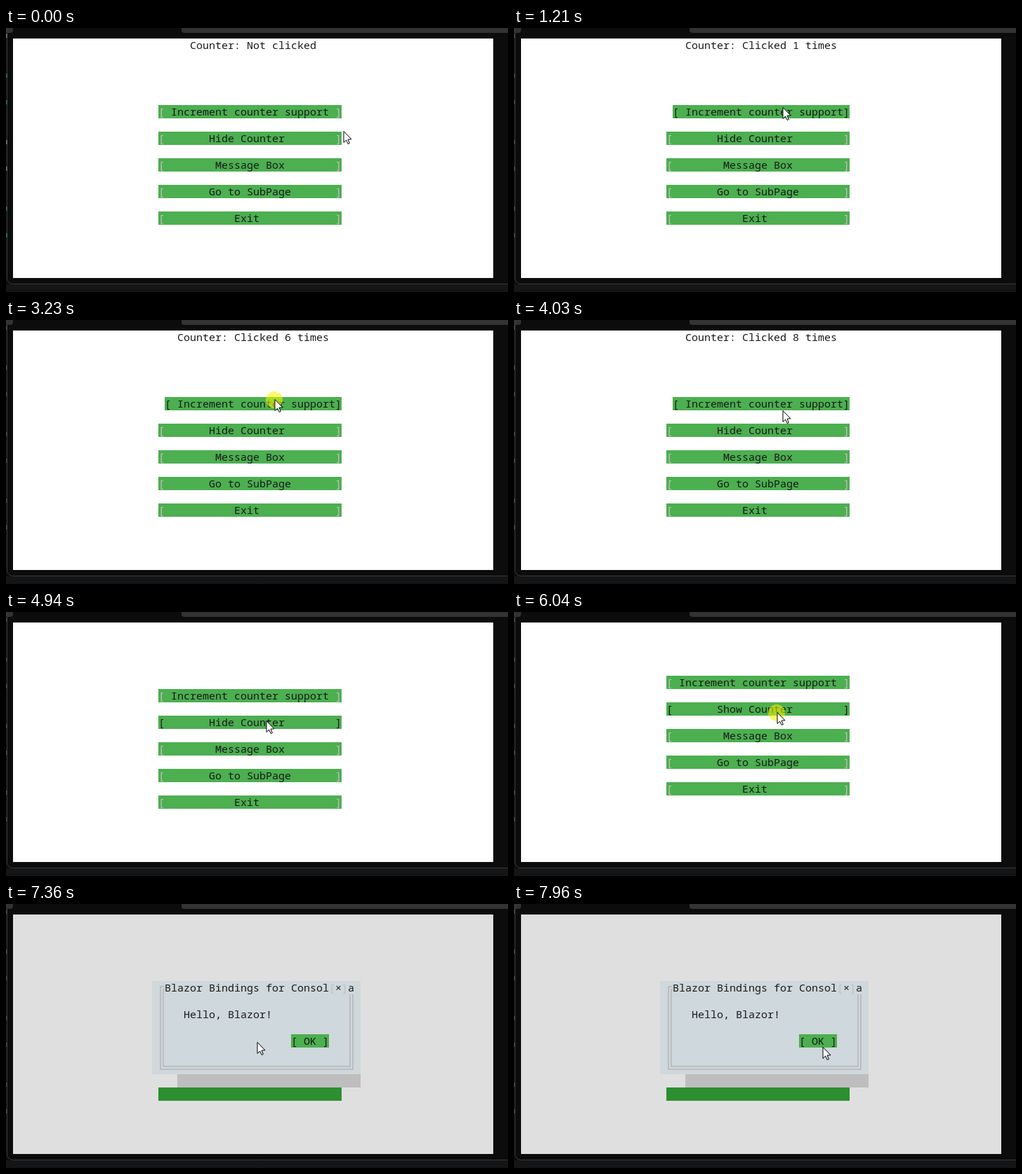
An HTML page with a canvas for the animation above (8 s loop, 715 by 377 pixels).

```html
<!DOCTYPE html>
<html>
<head>
<meta charset="utf-8">
<style>
html, body { margin: 0; width: 100%; height: 100%; overflow: hidden; background: #0c0c0c; }
canvas { display: block; }
</style>
</head>
<body>
<canvas id="stage" width="715" height="377"></canvas>
<script>
const c = document.getElementById('stage').getContext('2d');
const LOOP = 8000, STEP = 100, COL = 9, ROW = 19;
const INK = '#1a1a1a', GREEN = '#4caf50', DIM = '#c0c0c0', PANEL = '#cfd8dc';

// Pointer moves: start time, number of steps, end point
const moves = [
  [100, 4, 397, 103], [600, 2, 389, 113], [1110, 1, 382, 113], [4030, 1, 382, 129],
  [4130, 4, 370, 155], [5540, 4, 374, 143], [6540, 8, 357, 197], [7460, 6, 439, 204]
];
const counts = [1110, 2010, 2310, 2410, 2830, 3230, 3430, 3730];
const HIDE = 4840, SHOW = 6040, FOCUS_BOX = 7260, DIALOG = 7360, HOLD = 400;
const clicks = [...counts, HIDE, SHOW];

const since = (times, t, from, to) => times.some(k => t >= k + from && t < k + to);

function rect(x, y, w, h, color) {
  c.fillStyle = color;
  c.fillRect(x, y, w, h);
}

function text(s, x, y, color = INK) {
  c.fillStyle = color;
  c.fillText(s, x, y + 15);
}

function pointerAt(t) {
  let x = 480, y = 147;
  for (const [start, n, ex, ey] of moves) {
    if (t < start) break;
    const p = Math.min(1, (Math.floor((t - start) / STEP) + 1) / n);
    x += (ex - x) * p;
    y += (ey - y) * p;
  }
  return [Math.round(x), Math.round(y)];
}

function pointer(x, y, held) {
  if (held) {
    c.fillStyle = 'rgba(245,245,0,.57)';
    c.beginPath();
    c.arc(x, y + 1, 12, 0, 7);
    c.fill();
  }
  c.save();
  c.translate(x + 1, y + .5);
  c.fill(arrow);
  c.fillStyle = '#fff';
  c.fill(arrow);
  c.strokeStyle = '#000';
  c.lineWidth = 1;
  c.stroke(arrow);
  c.restore();
}
const arrow = new Path2D('M0 0V16L3.6 12.6L6.2 18L8.4 17L6 11.7L11 11.3Z');

function surround(t) {
  rect(0, 0, 715, 377, '#0c0c0c');
  rect(0, 366, 715, 11, '#141516');
  c.fillStyle = '#333';
  c.beginPath();
  c.roundRect(-5, -5, 15, 12, 4);
  c.roundRect(250, -5, 480, 12, 4);
  c.fill();
  c.strokeStyle = '#3a3a3a';
  c.lineWidth = 1;
  c.beginPath();
  c.roundRect(1.5, -10, 720, 375.5, 8);
  c.stroke();
  // Cut-off code lines at the left edge
  for (let row = 0; row < 18; row++) {
    if (row * 7 % 5 < 2) rect(0, 8 + row * ROW, 2, 6, t >= counts[0] ? '#444' : row % 2 ? '#1f7040' : '#666');
  }
}

function button(label, y, focused, push) {
  const dx = push ? COL : 0, edge = focused ? INK : DIM;
  const col = Math.ceil((28 - label.length) / 2);
  rect(217 + dx, y, 261 - dx, ROW, GREEN);
  text('[', 217 + dx, y, edge);
  text(label, 217 + col * COL + dx, y);
  text(']', 469, y, edge);
}

function page(t) {
  rect(10, 15, 684, 342, '#fff');
  const count = counts.filter(k => t >= k).length;
  if (t < HIDE + 100 || t >= SHOW + 200) {
    if (count) text(`Counter: Clicked ${count} times`, 244, 15);
    else text('Counter: Not clicked', 262, 15);
  }
  const raised = t >= HIDE + 200 && t < SHOW + 200;
  const focus = [counts[0], HIDE + 100, FOCUS_BOX].filter(k => t >= k).length - 1;
  const push = since(counts, t, 0, HOLD) || since([HIDE, SHOW], t, 200, HOLD);
  const toggle = raised ? 'Show Counter' : 'Hide Counter';
  ['Increment counter support', toggle, 'Message Box', 'Go to SubPage', 'Exit'].forEach((label, i) =>
    button(label, (raised ? 91 : 110) + i * 2 * ROW, i === focus, i === focus && push));
}

function dialog() {
  rect(10, 15, 684, 342, '#dfdfdf');
  rect(217, 262, 261, ROW, '#2c8f30');
  rect(244, 243, 261, ROW, '#bebebe');
  rect(208, 110, 297, 133, PANEL);
  c.strokeStyle = '#bbbdbe';
  c.lineWidth = 2;
  c.strokeRect(220, 118, 274, 118);
  c.strokeRect(224, 122, 266, 110);
  rect(226, 110, 270, ROW, PANEL);
  text('Blazor Bindings for Consol', 226, 110);
  text('[ ]', 460, 110, DIM);
  text('× a', 469, 110);
  text('Hello, Blazor!', 253, 148);
  rect(406, 186, 54, ROW, GREEN);
  text('[ OK ]', 406, 186);
}

function draw(now) {
  const t = now % LOOP;
  c.font = '15px "Noto Sans Mono", "DejaVu Sans Mono", monospace';
  surround(t);
  if (t < DIALOG) page(t);
  else dialog();
  pointer(...pointerAt(t), since(clicks, t, 0, STEP));
  requestAnimationFrame(draw);
}
requestAnimationFrame(draw);
</script>
</body>
</html>
```
